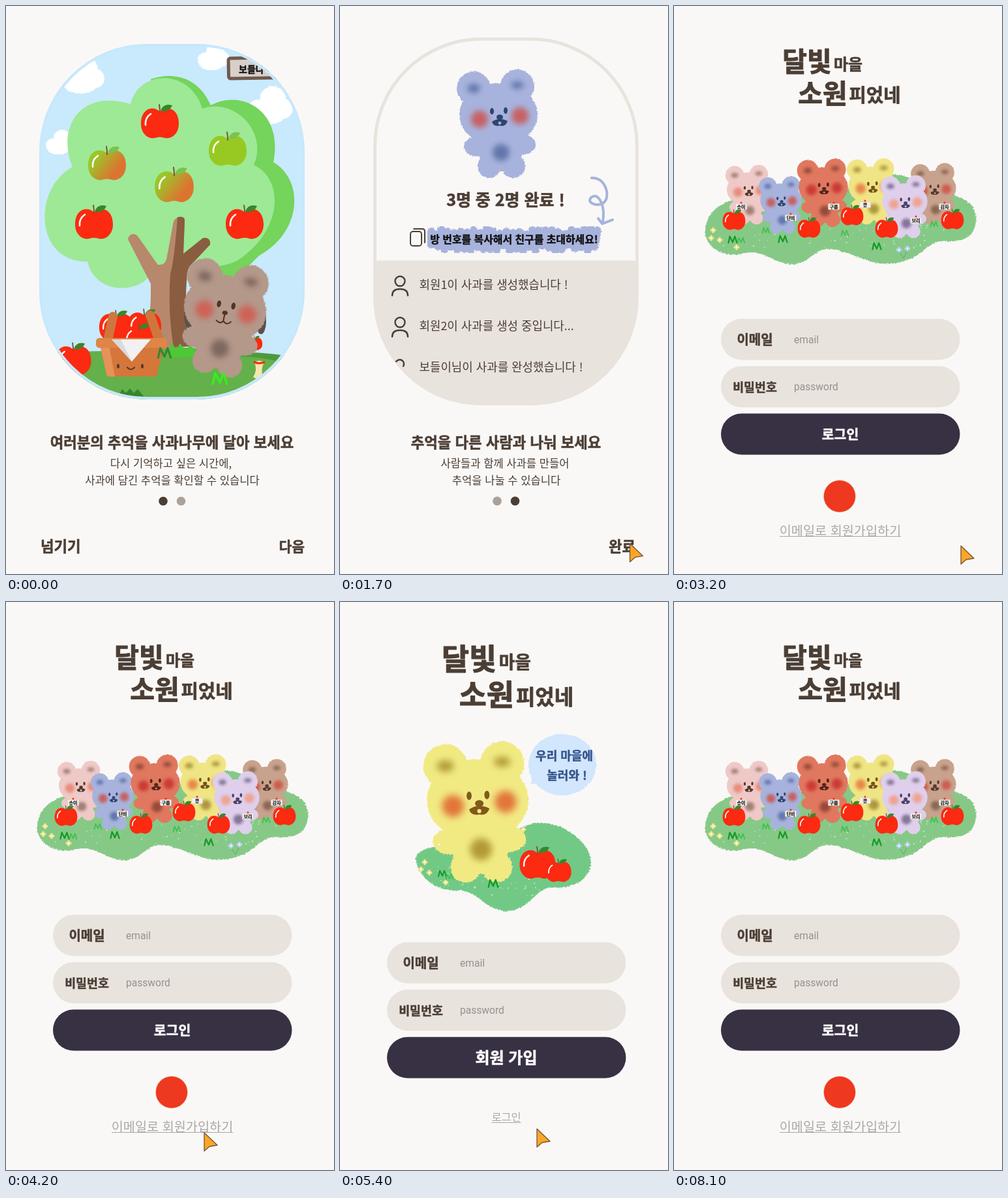
An HTML page for the animation above (8200 ms loop, 503 by 869 pixels).

```html
<!DOCTYPE html>
<html lang="ko">
<head>
<meta charset="utf-8">
<style>
html, body { margin: 0; width: 100%; height: 100%; overflow: hidden; background: #faf8f6; }
svg { display: block; width: 100%; height: 100%; }
text { font-family: 'Noto Sans CJK KR', 'Noto Sans CJK', 'Noto Sans CJK JP', sans-serif; }
.latin { font-family: Roboto, sans-serif; }
</style>
</head>
<body>
<svg id="stage" viewBox="0 0 503 869"></svg>
<script>
const BROWN = '#4b3e35', BEIGE = '#e9e3dd', BLUE = '#a7b3dc', RED = '#fb2a10';
const CX = 254.5, CY = 434;

const at = (x, y, s, body, rot = 0) =>
  `<g transform="translate(${x} ${y}) rotate(${rot}) scale(${s})">${body}</g>`;
const path = (d, fill, extra = '') => `<path d="${d}" fill="${fill}" ${extra}/>`;
const line = (d, color, w) =>
  path(d, 'none', `stroke="${color}" stroke-width="${w}" stroke-linecap="round" stroke-linejoin="round"`);
const oval = (x, y, rx, ry, fill) => `<ellipse cx="${x}" cy="${y}" rx="${rx}" ry="${ry}" fill="${fill}"/>`;
const dot = (x, y, r, fill) => oval(x, y, r, r, fill);
const box = (x, y, w, h, r, fill, extra = '') =>
  `<rect x="${x}" y="${y}" width="${w}" height="${h}" rx="${r}" fill="${fill}" ${extra}/>`;
// y is the middle of the glyphs; bold text gets a thin round outline
const text = (str, x, y, size, { fill = BROWN, weight = 700, anchor = 'middle', cls = '' } = {}) =>
  `<text x="${x}" y="${y + size * .36}" font-size="${size}" fill="${fill}" font-weight="${weight}" text-anchor="${anchor}" class="${cls}"` +
  ` stroke="${weight < 700 ? 'none' : fill}" stroke-width="${size * .025}" stroke-linejoin="round">${str}</text>`;

let seed = 7;
const rnd = () => (seed = seed * 16807 % 2147483647) / 2147483647;
const rough = body => `<g filter="url(#rough)">${body}</g>`;

const apple = (x, y, s = 1, fill = RED) => at(x, y, s,
  path('M0-18C-8-28-29-25-29 0C-29 17-16 24-8 22Q0 19 8 22C16 24 29 17 29 0C29-25 8-28 0-18Z', fill) +
  line('M0-17Q0-24-1-29', '#80503a', 2) +
  path('M1-20Q6-32 19-28Q14-16 1-20Z', fill === RED ? '#38862c' : '#7dc14f') +
  line('M-22 2Q-23-9-14-15', '#fff', 2.6));

function bear(x, y, s, { fur, spot, cheek = '#d04a40', face, rot = 0, plain = false }) {
  const muzzle = plain
    ? oval(1, 6, 4, 3, face) + line('M-9 19Q-3 24 1 18Q7 24 12 17M1 8V18', face, 2)
    : oval(2, 4, 5, 4, face) + path('M-10 11Q-4 7 2 7Q9 7 14 10Q11 19 2 17Q-8 19-10 11Z', face) + dot(2, 13, 2.4, fur);
  return at(x, y, s, rough(
      oval(0, 0, 60, 48, fur) + dot(-38, -40, 26, fur) + dot(29, -43, 26, fur) +
      oval(-35, 49, 18, 15, fur) + oval(39, 46, 18, 15, fur) + oval(3, 55, 34, 32, fur) +
      oval(-14, 79, 18, 18, fur) + oval(23, 79, 18, 18, fur)) +
    `<g filter="url(#soft)" opacity=".78">` +
      oval(-38, -40, 10, 7, spot) + oval(29, -45, 10, 6, spot) +
      dot(-29, 7, 13, cheek) + dot(33, 2, 13, cheek) + dot(4, 58, 13, spot) +
    `</g>` + oval(-10, -5, 3, 5, face) + oval(11, -6, 3, 5, face) + muzzle, rot);
}

const grass = (x, y, color, s = 1) => at(x, y, s, line('M-6 5L-4-4L0 4L3-4L6 5', color, 2));
const flower = (x, y, color) => [0, 1, 2, 3].map(i =>
  dot(x + 2.5 * Math.cos(i * 1.57), y + 2.5 * Math.sin(i * 1.57), 2, color)).join('') + dot(x, y, 1.2, '#fff');
const specks = (n, x, y, w, h) => Array.from({ length: n }, () =>
  dot(x + rnd() * w, y + rnd() * h, .4 + rnd() * .7, '#d2efd0')).join('');
const cloud = (x, y, s) => at(x, y, s, rough(
  dot(-18, 5, 14, '#fff') + dot(4, -10, 19, '#fff') + dot(18, 4, 15, '#fff') + oval(-4, 14, 25, 13, '#fff')));
const pager = (a, b) => dot(241, 757.5, 6.8, a) + dot(268.5, 757.5, 6.8, b);

// A crayon scribble that zigzags between two ragged edges
function scribble(x0, x1, y0, y1) {
  let d = `M${x0} ${y0}`;
  for (let x = x0, i = 0; x < x1; x += 5, i++) d += `L${x} ${(i % 2 ? y0 : y1) + rnd() * 10 - 5}`;
  return rough(line(d, BLUE, 12));
}

function captions(title, first, second) {
  return text(title, CX, 668, 22.3) + text(first, 253, 700, 16.6, { weight: 500 }) +
    text(second, 255, 726, 16.6, { weight: 500 });
}

function orchard() {
  const basket =
    apple(169, 492, .9) + apple(212, 490, .9) + apple(204, 510, .85) +
    line('M164 475L156 512', '#cf763e', 14) + line('M221 473L235 512', '#cf763e', 14) +
    path('M144 518H242L232 563Q231 567 227 567H159Q155 567 154 563Z', '#d5763a') +
    path('M144 518H158L167 567H159Q155 567 154 563Z', '#e69258') +
    box(138, 508, 109, 15, 5, '#de8547') + path('M162 510H222L193 544Z', '#f2f0f0') + path('M162 510H176L193 544Z', '#d9dadd') +
    oval(172, 551, 2, 3.5, '#59392e') + oval(209, 551, 2, 3.5, '#59392e') + line('M186 553Q191 559 197 553', '#59392e', 2.2);
  return `<g clip-path="url(#frame1)">` + box(51, 58, 407, 544, 165, '#c9e9fd') +
    cloud(118, 107, 1) + cloud(83, 209, .68) + cloud(318, 78, .75) + cloud(405, 153, 1.05) +
    box(341, 80, 95, 31, 3, '#d9cfca', 'stroke="#6f594d" stroke-width="5" transform="rotate(-1 341 80)"') +
    text('보들나무', 357, 97, 14, { fill: '#111', anchor: 'start' }) +
    path('M222 112C265 98 298 115 314 152C362 126 426 162 410 239C457 266 455 345 388 382C365 405 355 416 335 416L250 380Z', '#74d45b') +
    path('M191 150C204 96 283 96 301 157C353 140 402 195 380 243C426 265 425 340 360 386C340 400 305 402 275 396L222 410C205 440 137 443 125 391C44 392 40 280 102 246C78 190 110 126 191 150Z', '#9de995') +
    path('M51 547Q80 527 150 528Q260 512 440 540V604H51Z', '#64b04b') +
    path('M330 530Q380 528 430 535L425 546Q380 533 330 538Z', '#4d9a3d') +
    path('M187 357C189 347 199 346 204 355L233 396Q243 397 246 388L257 329Q266 317 274 328L272 379L302 355Q314 353 313 365L282 398Q275 405 276 470Q278 515 290 520L205 528Q223 500 222 425Z', '#b7886b') +
    path('M263 323Q275 321 274 329L272 379L302 355Q314 353 313 365L282 398Q275 405 276 470Q278 515 290 520L257 522Q248 470 252 410Q258 390 263 323Z', '#8a5d41') +
    apple(236, 180) + apple(135, 334) + apple(366, 334) + apple(340, 222, 1, '#98c922') +
    apple(155, 244, 1, 'url(#ripe)') + apple(258, 277, 1.03, 'url(#ripe)') +
    apple(103, 543, .95) + apple(381, 517, .42) +
    path('M381 545Q388 540 396 545Q390 556 394 568Q386 572 379 568Q386 557 381 545Z', '#f6e6b0') + line('M381 545Q388 548 396 545', RED, 3) +
    path('M248 536L254 514L261 526L267 516L274 526L284 518L293 534Q270 540 248 536Z', '#4cc934') +
    path('M172 598L178 586L184 592L190 585L196 592L202 586L212 598Z', '#36862c') +
    basket + grass(243, 530, '#38862c', 1.6) +
    oval(281, 473, 8, 20, '#5c5049') + oval(391, 482, 8, 20, '#5c5049') +
    bear(336, 463, 1.06, { fur: '#b4988a', spot: '#6f5a54', cheek: '#d5544a', face: '#513427', rot: 11.5, plain: true }) +
    grass(328, 569, '#35ee1c', 1.8) + '</g>' +
    box(53, 60, 403, 540, 163, 'none', 'stroke="#c7e8fc" stroke-width="4"') +
    captions('여러분의 추억을 사과나무에 달아 보세요', '다시 기억하고 싶은 시간에,', '사과에 담긴 추억을 확인할 수 있습니다') +
    pager(BROWN, '#aaa19b') + text('넘기기', 53, 827, 22.3, { anchor: 'start' }) + text('다음', 458, 827, 21.5, { anchor: 'end' });
}

function sharing() {
  const rows = ['회원1이 사과를 생성했습니다 !', '회원2이 사과를 생성 중입니다...', '보들이님이 사과를 완성했습니다 !'];
  const person = y => `<circle cx="92" cy="${y - 8}" r="7.5" fill="none" stroke="${BROWN}" stroke-width="2.4"/>` +
    line(`M80 ${y + 14}Q80 ${y + 4} 92 ${y + 4}Q104 ${y + 4} 104 ${y + 14}`, BROWN, 2.4);
  return `<g clip-path="url(#frame2)">` + box(51, 389.5, 407, 260, 8, BEIGE) + '</g>' +
    box(53.5, 50.5, 402, 558, 163, 'none', `stroke="${BEIGE}" stroke-width="5"`) +
    bear(243, 166, 1, { fur: BLUE, spot: '#50669f', face: '#2d456f' }) +
    text('3명 중 2명 완료 !', 254, 297, 25) + scribble(140, 398, 345, 370) +
    text('방 번호를 복사해서 친구를 초대하세요!', 267, 357, 15.9, { fill: '#111' }) +
    box(108, 345, 17, 22, 4, 'none', `stroke="${BROWN}" stroke-width="2"`) + line('M113 341H126Q130 341 130 345V362', BROWN, 2) +
    line('M386 263Q404 263 409 283Q412 304 393 304Q379 301 385 293Q394 286 401 301Q406 313 403 331M396 325L402 333L418 327', BLUE, 4) +
    rows.map((r, i) => text(r, 121.5, 427 + i * 63, 17.9, { weight: 500, anchor: 'start' })).join('') +
    person(429) + person(492) + line('M86 544Q92 538 97 544Q99 548 97 551', BROWN, 2.4) +
    captions('추억을 다른 사람과 나눠 보세요', '사람들과 함께 사과를 만들어', '추억을 나눌 수 있습니다') +
    pager('#aaa19b', BROWN) + text('완료', 412, 827, 22.3, { anchor: 'start' });
}

const heading = () =>
  text('달빛', 204, 85, 41, { weight: 900 }) + text('마을', 267, 89, 24) +
  text('소원', 228, 134, 41, { weight: 900 }) + text('피었네', 308, 137, 28.6);

function form(top, label, size) {
  const field = (y, name, hint, s) => box(72, y, 366.5, 63, 31.5, BEIGE) + text(name, 124, y + 32, s) +
    text(hint, 184, y + 31.5, 15.6, { fill: '#96918d', weight: 400, anchor: 'start', cls: 'latin' });
  return field(top, '이메일', 'email', 20) + field(top + 72.5, '비밀번호', 'password', 18.4) +
    box(72, top + 145, 366.5, 63, 31.5, '#383043') + text(label, 255, top + 177, size, { fill: '#fff' });
}

const link = (str, y, size, w) => text(str, 255, y, size, { fill: '#aaa8a6', weight: 400 }) +
  box(255 - w / 2, y + 8, w, 1, 0, '#aaa8a6');

function login() {
  const tag = (str, x, y) => box(x - 8.5, y - 4.5, 17, 9, 1, '#f5f0ec', 'stroke="#cfc4bc" stroke-width=".5"') +
    text(str, x, y, 7.2, { fill: '#222' }) + dot(x, y - 6, 1.5, RED);
  return heading() +
    rough(path('M48 347C47 315 75 295 110 295C200 292 250 290 310 262C360 246 380 280 410 290C440 288 463 300 463 326C463 352 445 361 420 360C390 355 385 383 350 391C310 402 285 382 255 375C215 362 215 392 185 395C150 396 140 370 105 379C75 385 50 370 48 347Z', '#86c987')) +
    specks(60, 75, 335, 340, 35) +
    bear(114, 281, .55, { fur: '#efc9c7', spot: '#8d6b60', cheek: '#e67c68', face: '#56382e' }) +
    bear(399, 279, .56, { fur: '#c8a28c', spot: '#7a5846', face: '#59382a' }) +
    bear(304, 275, .61, { fur: '#f0e585', spot: '#9b8128', cheek: '#e56f38', face: '#76531d' }) +
    bear(164, 297, .53, { fur: BLUE, spot: '#50669f', face: '#2d456f' }) +
    bear(229, 277, .63, { fur: '#e0785f', spot: '#823d2f', cheek: '#c62a28', face: '#54251c' }) +
    bear(354, 299, .58, { fur: '#dfcfec', spot: '#6b5d82', cheek: '#f4987a', face: '#4a4168' }) +
    tag('송이', 103, 307) + tag('단비', 179, 324) + tag('구름', 245, 307) + tag('콩', 293, 304) + tag('보리', 371, 328) + tag('감자', 415, 307) +
    [[92, 329], [207, 341], [273, 322], [326, 341], [427, 328]].map(([x, y]) => apple(x, y, .6)).join('') +
    [[90, 357], [167, 356], [311, 367]].map(([x, y]) => grass(x, y, '#159a25', 1.1)).join('') +
    [[103, 358], [141, 343], [262, 347], [399, 333]].map(([x, y]) => grass(x, y, '#44bf50', .9)).join('') +
    [[60, 343], [57, 355], [70, 358], [96, 369]].map(([x, y]) => flower(x, y, '#f1e78b')).join('') +
    line('M345 376L352 386L358 374', '#5aaa6a', 1) + flower(345, 373, '#b9d3f1') + flower(358, 371, '#b9d3f1') +
    form(478.5, '로그인', 20.5) + dot(254, 750, 24.7, '#e2a58a') + dot(254, 750, 24, '#ee381f') +
    link('이메일로 회원가입하기', 803, 19.7, 186);
}

function signup() {
  const navy = { fill: '#35558d' };
  return `<g transform="translate(256 88) scale(1.115) translate(-256 -85)">${heading()}</g>` +
    rough(path('M116 392C120 370 170 372 215 372C260 365 265 342 305 338C345 336 385 370 385 398C383 428 355 438 325 437C300 436 295 470 255 473C220 470 215 445 185 441C150 446 118 420 116 392Z', '#72c986')) +
    specks(55, 150, 405, 170, 45) +
    bear(211, 303, 1.3, { fur: '#f1ea83', spot: '#a08420', cheek: '#de5526', face: '#80591c' }) +
    [[130, 398], [124, 409], [137, 414], [162, 429], [152, 371], [281, 348]].map(([x, y]) => flower(x, y, '#f0e592')).join('') +
    grass(157, 415, '#159a25', 1) + grass(168, 420, '#44bf50', .9) + grass(235, 430, '#159a25', 1.2) +
    apple(303, 402, .95) + apple(335, 413, .68) +
    rough(oval(341, 249, 52, 47, '#d2e6fd') + path('M297 255L292 279L312 277Z', '#d2e6fd')) +
    text('우리 마을에', 344, 236, 18, navy) + text('놀러와 !', 348, 266, 18, navy) +
    form(520.5, '회원 가입', 24) + link('로그인', 788, 16.4, 45);
}

const stage = document.getElementById('stage');
stage.innerHTML = `<defs>
  <filter id="rough" x="-10%" y="-10%" width="120%" height="120%" color-interpolation-filters="sRGB"><feTurbulence type="fractalNoise" baseFrequency=".4" numOctaves="2" seed="3"/><feDisplacementMap in="SourceGraphic" scale="4" xChannelSelector="R" yChannelSelector="G"/></filter>
  <filter id="soft" x="-20%" y="-20%" width="140%" height="140%" color-interpolation-filters="sRGB"><feGaussianBlur stdDeviation="4"/></filter>
  <linearGradient id="ripe" x2="1" y2=".6"><stop offset=".25" stop-color="#9bc629"/><stop offset=".85" stop-color="#dc7430"/></linearGradient>
  <clipPath id="frame1">${box(51, 58, 407, 544, 165, '#000')}</clipPath>
  <clipPath id="frame2">${box(51, 48, 407, 563, 165, '#000')}</clipPath></defs>` +
  [orchard, sharing, login, signup].map(draw => `<g class="page">${box(0, 0, 509, 869, 0, '#faf8f6')}${draw()}</g>`).join('') +
  `<g id="cursor">${path('M0 0V28L8 21L20 19Z', '#fba626', 'stroke="#70543b" stroke-width="1.3" stroke-linejoin="round"')}</g>`;
const pages = [...document.querySelectorAll('.page')];
const cursor = document.getElementById('cursor');

const clamp = v => Math.min(1, Math.max(0, v));
const cubic = (a, b, c, d, s) =>
  a * (1 - s) ** 3 + 3 * b * s * (1 - s) ** 2 + 3 * c * s * s * (1 - s) + d * s ** 3;

// Quick start, very long settle: two joined Bezier pieces
function zoomEase(u) {
  if (u >= 1) return 1;
  const [xs, ys] = u < 1 / 6
    ? [[0, .05, .1333, 1 / 6], [0, 0, .06, .4]]
    : [[1 / 6, .2083, .25, 1], [.4, .82, 1, 1]];
  let lo = 0, hi = 1;
  for (let i = 0; i < 20; i++) {
    const mid = (lo + hi) / 2;
    if (cubic(...xs, mid) < u) lo = mid; else hi = mid;
  }
  return cubic(...ys, lo);
}

// start time, page left, page entered
const moves = [[1351, 0, 1], [2764, 1, 2], [4965, 2, 3], [6799, 3, 2]];
// time, x, y of the pointer tip
const trail = [[800, 462, 821], [1300, 445, 822], [2200, 444, 823], [2700, 440, 826], [3200, 440, 826],
  [4000, 304, 812], [4900, 304, 812], [5300, 302, 806], [5900, 302, 806], [6600, 254, 787], [7300, 254, 787]];

function show(i, scale, opacity) {
  pages[i].style.display = '';
  pages[i].setAttribute('opacity', opacity);
  pages[i].setAttribute('transform', `translate(${CX} ${CY}) scale(${scale}) translate(${-CX} ${-CY})`);
}

function render(t) {
  pages.forEach(p => p.style.display = 'none');
  const move = moves.filter(m => m[0] <= t).pop();
  if (!move) show(0, 1, 1);
  else {
    const [start, from, to] = move, d = t - start, e = zoomEase(d / 400), back = to < from;
    if (d < 400) show(from, back ? 1 - .1 * e : 1 + .15 * e, back ? 1 - clamp((d - 35) / 50) : 1);
    show(to, back ? 1.1 - .1 * e : .85 + .15 * e, back ? 1 : clamp((d - 50) / 130));
  }
  const k = trail.findIndex(p => p[0] > t);
  cursor.style.display = k > 0 ? '' : 'none';
  if (k > 0) {
    const [t0, x0, y0] = trail[k - 1], [t1, x1, y1] = trail[k];
    const u = (t - t0) / (t1 - t0), e = u * u * (3 - 2 * u);
    cursor.setAttribute('transform', `translate(${x0 + (x1 - x0) * e} ${y0 + (y1 - y0) * e})`);
  }
}

const begin = performance.now();
let last = -1;
function tick() {
  // ten pictures a second
  const t = Math.floor((performance.now() - begin) % 8200 / 100) * 100;
  if (t !== last) render(last = t);
  requestAnimationFrame(tick);
}
tick();
</script>
</body>
</html>
```
